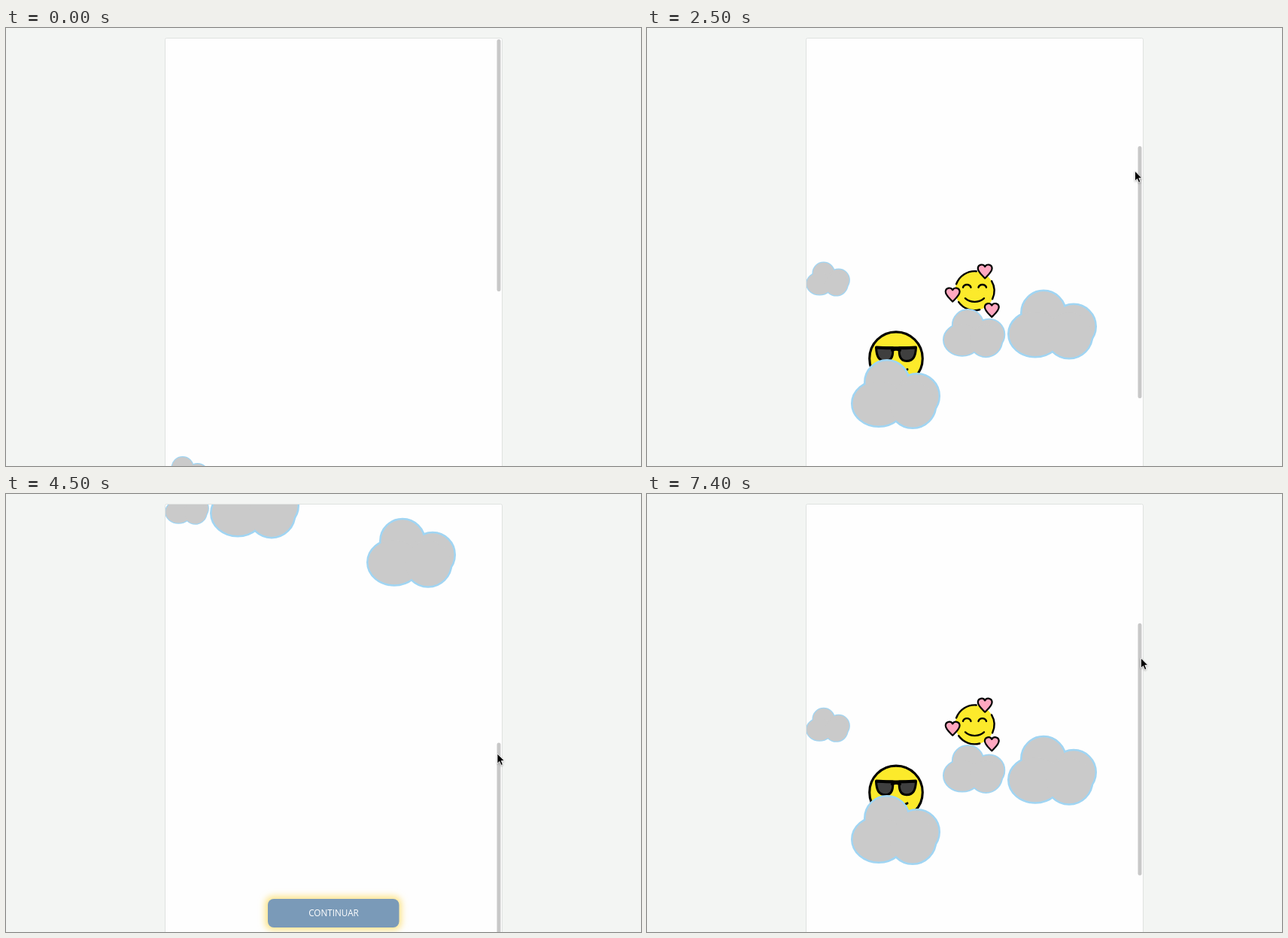
An HTML page for the animation above (8000 ms loop, 844 by 582 pixels).

```html
<!DOCTYPE html>
<html lang="es">
<head>
<meta charset="utf-8">
<title>Parallax scroll</title>
<style>
  html, body { margin: 0; width: 100%; height: 100%; overflow: hidden; background: #f3f5f3; }
  svg { display: block; }
  #button rect { fill: #7a9ab8; }
  #button text { font: 11.7px "Open Sans", "Noto Sans", sans-serif; fill: #fff; text-anchor: middle; }
  .line { fill: none; stroke: #000; stroke-linecap: round; stroke-linejoin: round; }
</style>
</head>
<body>
<svg width="844" height="582" viewBox="0 0 844 582">
  <defs>
    <clipPath id="view"><rect x="212" y="14" width="447" height="580"/></clipPath>
    <filter id="glow" x="-20%" y="-60%" width="140%" height="220%"><feGaussianBlur stdDeviation="4.5"/></filter>
    <filter id="shade" x="-50%" y="-50%" width="200%" height="200%">
      <feDropShadow dx="0" dy="1" stdDeviation="0.8" flood-opacity=".3"/>
    </filter>
    <g id="lobes">
      <circle cx="48" cy="31" r="28.5"/>
      <circle cx="88" cy="49" r="28.5"/>
      <ellipse cx="37" cy="59" rx="34.5" ry="29.5"/>
      <circle cx="82" cy="60.5" r="30"/>
    </g>
    <g id="cloud">
      <use href="#lobes" stroke="#a0d5f3" stroke-width="5"/>
      <use href="#lobes" fill="#cacaca"/>
    </g>
    <path id="heart" class="line" style="fill:#ffa7c0" stroke-width="2.2"
      d="M0 9.4C-4 5-9.4 1-9.4-4A5 5 0 0 1 0-6A5 5 0 0 1 9.4-4C9.4 1 4 5 0 9.4z"/>
    <path id="lens" d="M-26.5-14.5H-4.5C-3.5-5-5 3.3-14 3.3C-23 3.3-26-3-26.5-14.5z"
      fill="#3f3f3f" stroke="#000" stroke-width="3" stroke-linejoin="round"/>
  </defs>

  <rect x="211.5" y="13.5" width="448" height="600" rx="2" fill="#fefefe" stroke="#dfe2e0"/>

  <!-- data-y is the position before scrolling, data-rate the layer speed -->
  <g clip-path="url(#view)">
    <g class="layer" data-x="435.5" data-y="762.4" data-rate="2.91">
      <circle r="26" fill="#fcea2b"/>
      <g class="line" stroke-width="2.4">
        <path d="M-24.4-8.9A26 26 0 0 1 2.3-25.9M22.5-13A26 26 0 0 1 23.6 11M6.7 25.1A26 26 0 0 1-21.3 14.9"/>
        <path d="M-15.5-4.5C-14-9.5-6.5-9.5-5-4.5M5-4.5C6.5-9.5 14-9.5 15.5-4.5M-12.5 10C-6 16.3 6 16.3 12.5 10"/>
      </g>
      <use href="#heart" x="13.7" y="-26"/>
      <use href="#heart" x="-29.3" y="5"/>
      <use href="#heart" x="22.8" y="25.5"/>
    </g>
    <g class="layer" data-x="331" data-y="852.4" data-rate="2.91">
      <circle r="35.3" fill="#fcea2b" stroke="#000" stroke-width="3.1"/>
      <use href="#lens"/>
      <use href="#lens" transform="scale(-1 1)"/>
      <path class="line" stroke-width="4" d="M-26-14.8Q0-13 26-14.8M-5-11Q0-14 5-11"/>
      <path class="line" stroke-width="3" d="M-15 14.5C-8 19 8 19 15 14.5"/>
    </g>
    <use class="layer" href="#cloud" data-x="211" data-y="569" data-rate="1.82" data-scale=".495"/>
    <use class="layer" href="#cloud" data-x="479" data-y="606" data-rate="1.82"/>
    <use class="layer" href="#cloud" data-x="393" data-y="760.7" data-rate="2.73" data-scale=".7"/>
    <use class="layer" href="#cloud" data-x="271" data-y="827.7" data-rate="2.73"/>
    <g id="button" class="layer" data-x="348" data-y="1112.2" data-rate="1.82">
      <rect x="-4" y="-4" width="182" height="46" rx="11" style="fill:#fde58f" filter="url(#glow)"/>
      <rect width="174.5" height="38" rx="8"/>
      <text x="87.5" y="23.3">CONTINUAR</text>
    </g>
  </g>

  <rect id="thumb" x="652.5" width="5" height="335" rx="2.5" fill="#c8c8c8"/>
  <path id="cursor" filter="url(#shade)" stroke="#fff" stroke-width=".8"
    d="M0 0V13.2L3 10.4L5.1 15.4L7.4 14.4L5.3 9.6H9.4z"/>
</svg>

<script>
const LOOP = 8000, STEP = 100;

// [time, scrollbar offset]
const scrollKeys = [
  [1500, 0], [1800, 17], [1950, 40], [2500, 142], [3300, 276], [3700, 343], [3900, 361],
  [4100, 361], [4300, 349], [4500, 315.5], [5000, 240], [5400, 172], [5600, 156.7]
];
// [time, x, y] of the pointer tip
const cursorKeys = [
  [200, 826, 107], [400, 780, 106], [700, 690, 72], [1000, 644, 40], [1200, 649, 36],
  [1300, 653.5, 39], [1500, 653.5, 39], [1800, 653.5, 56], [1950, 653, 84], [2500, 648.5, 190],
  [3300, 648.5, 324], [3700, 651, 388], [3900, 652, 400], [4100, 652, 400], [4300, 655, 382],
  [4500, 653, 345], [5000, 647, 257], [5400, 647, 202], [5600, 647, 196], [6600, 647, 196],
  [6800, 663, 216], [7000, 663, 216], [7200, 650, 213], [7400, 656.5, 218]
];

function sample(keys, t) {
  const next = keys.findIndex(k => k[0] > t);
  if (next === 0) return keys[0].slice(1);
  if (next < 0) return keys.at(-1).slice(1);
  const a = keys[next - 1], b = keys[next];
  const p = (t - a[0]) / (b[0] - a[0]);
  return a.slice(1).map((v, i) => v + (b[i + 1] - v) * p);
}

const layers = [...document.querySelectorAll('.layer')];
const thumb = document.getElementById('thumb');
const cursor = document.getElementById('cursor');

function draw(now) {
  const t = Math.floor(now % LOOP / STEP) * STEP;
  const [scroll] = sample(scrollKeys, t);
  const [x, y] = sample(cursorKeys, t);
  for (const layer of layers) {
    const d = layer.dataset;
    layer.setAttribute('transform', `translate(${d.x} ${d.y - d.rate * scroll}) scale(${d.scale || 1})`);
  }
  thumb.setAttribute('y', 15 + scroll);
  cursor.setAttribute('transform', `translate(${x} ${y})`);
  cursor.style.display = t < cursorKeys[0][0] ? 'none' : '';
  requestAnimationFrame(draw);
}
requestAnimationFrame(draw);
</script>
</body>
</html>
```
